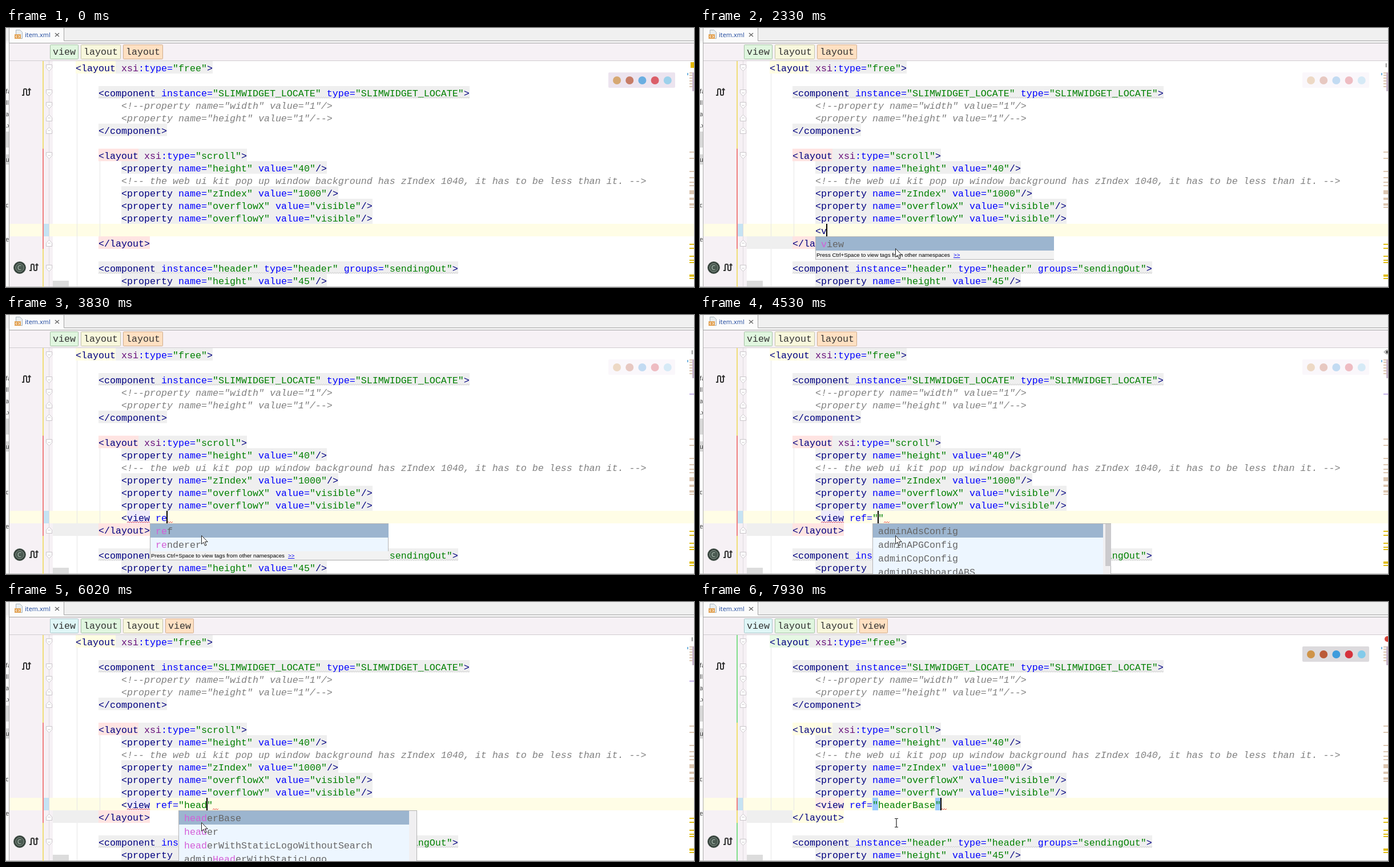
These frames come from a looping animation (1205x455 px, 8000 ms). An HTML page:

```html
<!DOCTYPE html>
<html lang="en">
<head>
<meta charset="utf-8">
<title>XML editor</title>
<style>
html, body { margin: 0; width: 100%; height: 100%; overflow: hidden; background: #fff; }
svg { display: block; width: 1205px; height: 455px; }
text { white-space: pre; font: 16.664px "Liberation Mono", monospace; }
.comment { font-style: italic; }
.ui { font: 11px "Open Sans", sans-serif; }
.hint { font: 9.7px "Liberation Sans", sans-serif; }
</style>
</head>
<body>
<svg viewBox="0 0 1205 455"><g id="base"></g><g id="live"></g></svg>
<script>
const ROW = 22, TOP = 58, CH = 10, EDIT = 13;
const GREY = '#efefef', RED = '#ffe4e2', YELLOW = '#fffde3', GREEN = '#e6f8e4';

const rect = (x, y, w, h, fill, more = '') =>
  `<rect x="${x}" y="${y}" width="${w}" height="${h}" fill="${fill}" ${more}/>`;
const path = (d, stroke, width = 1, fill = 'none', more = '') =>
  `<path d="${d}" stroke="${stroke}" stroke-width="${width}" fill="${fill}" ${more}/>`;
const circle = (x, y, r, fill, more = '') => `<circle cx="${x}" cy="${y}" r="${r}" fill="${fill}" ${more}/>`;
const esc = s => s.replace(/&/g, '&amp;').replace(/</g, '&lt;').replace(/>/g, '&gt;');
const text = (x, y, s, fill, more = '') => `<text x="${x}" y="${y}" fill="${fill}" ${more}>${s}</text>`;
const span = (s, fill) => `<tspan fill="${fill}">${esc(s)}</tspan>`;
const rowY = row => TOP + row * ROW;
const isComment = s => /<!--|-->/.test(s);

// [row, column x, code]
const code = [
  [0, 122, '<layout xsi:type="free">'],
  [2, 162, '<component instance="SLIMWIDGET_LOCATE" type="SLIMWIDGET_LOCATE">'],
  [3, 202, '<!--property name="width" value="1"/>'],
  [4, 202, '<property name="height" value="1"/-->'],
  [5, 162, '</component>'],
  [7, 162, '<layout xsi:type="scroll">'],
  [8, 202, '<property name="height" value="40"/>'],
  [9, 202, '<!-- the web ui kit pop up window background has zIndex 1040, it has to be less than it. -->'],
  [10, 202, '<property name="zIndex" value="1000"/>'],
  [11, 202, '<property name="overflowX" value="visible"/>'],
  [12, 202, '<property name="overflowY" value="visible"/>'],
  [14, 162, '</layout>'],
  [16, 162, '<component instance="header" type="header" groups="sendingOut">'],
  [17, 202, '<property name="height" value="45"/>']
];

function tokenColor(s, i) {
  if (i % 2 === 0) return '#000080';
  if (s[0] === '"') return '#008000';
  return s === 'xsi' ? '#660e7a' : '#0000ff';
}

function codeLine(row, x, s) {
  const y = rowY(row) + 18;
  if (isComment(s)) return text(x, y, esc(s), '#808080', 'class="comment"');
  const tokens = s.split(/("[^"]*"?|xsi|:?\w+=| \w+$)/);
  return text(x, y, tokens.map((p, i) => span(p, tokenColor(p, i))).join(''), '#000080');
}

function wave(x, y, w, color) {
  let d = `M${x} ${y + 1}`;
  for (let i = 2; i <= w; i += 2) d += `L${x + i} ${y + (i % 4 ? -1 : 1)}`;
  return path(d, color, .9);
}

function foldMark(row, end) {
  const y = rowY(row) + 12;
  const shape = end ? `M70.5 ${y + 5.5}h10v-6l-5-5l-5 5z` : `M70.5 ${y - 5.5}h10v6l-5 5l-5-5z`;
  return path(shape + `M73 ${y}h5`, '#c9c5c9', 1, '#fff');
}

const arrows = (x, y) =>
  path(`M${x - 7} ${y + 5}h3v-9q0-2 2-2h1q2 0 2 2v7q0 2 2 2h1q2 0 2-2v-8`, '#333', 2) +
  path(`M${x + 3} ${y - 4}l3-3.5l3 3.5z`, '#333', .6, '#333');

function drawBase() {
  let out = rect(0, 0, 1205, 455, '#fff') + rect(0, 0, 1205, 23, '#f0f0f0') + rect(0, 23, 1205, 4, '#f7f7f7') +
    rect(6, 0, 95, 26, '#fbfbfb') + path('M101.5 0V22.5H1205M6 26.5H1205', '#a5a5a5') +
    rect(6, 27, 1199, 30, '#f6f1f5') + rect(6, 57, 76, 398, '#f6f1f5') +
    path('M6 57.5H1205', '#d0ccd0');
  // File tab
  out += path('M17.5 3.5h7l4 4v11h-11z', '#a8b4bc', 1, '#e9eef1') + rect(15, 11, 11, 8, '#e3a65b') +
    path('M19 13l-2 2l2 2M22 13l2 2l-2 2', '#fff') +
    text(33, 16, 'item.xml', '#1a459c', 'class="ui"') + path('M86 9l7 6M86 15l7-6', '#666', 1.4);
  // Neighbouring pane
  out += rect(0, 27, 5, 428, '#fff') + rect(0, 182, 5, 28, '#d9d9d9') + rect(0, 222, 5, 18, '#d9d9d9');
  [['fa', 115], ['lli', 135], ['a', 155], ['.x', 175], ['uh', 235], ['c', 315], ['e', 375]]
    .forEach(([s, y]) => out += text(-1, y, s, '#333', 'class="ui"'));
  out += rect(6, 58, 58, 397, '#f6f1f5') + path('M5.5 0V455', '#aaa');
  // Current line and guides
  out += rect(6, rowY(EDIT), 1199, ROW, '#fffde6') + rect(66, rowY(EDIT), 10, ROW, '#c5e3f3') +
    path('M75.5 58V455', '#dedade') + path('M124.5 80V455M164.5 234V366', '#e6e6e6') +
    rect(82, 444, 28, 10, '#dcdcdc');
  [0, 2, 3, 7, 16].forEach(r => out += foldMark(r, false));
  [4, 5, 14].forEach(r => out += foldMark(r, true));
  out += arrows(35, 113) + arrows(48, 421) + circle(24, 421, 10.5, '#2c3832', 'stroke="#66736b"') +
    circle(24, 421, 7.5, '#4b5b52', 'stroke="#89968e"') + text(20, 425, 'C', '#b8c8bd', 'class="ui"');
  // Code backgrounds
  code.forEach(([row, x, s]) => {
    if (!isComment(s)) out += rect(x, rowY(row), s.length * CH, ROW, GREY);
  });
  out += wave(162, 122, 650, '#cfcfcf') + wave(162, 430, 630, '#cfcfcf');
  // Error stripe
  [78, 82, 87, 92, 97, 102, 217, 228, 251, 262, 270, 276, 314].forEach(y => out += rect(1197, y, 8, 2, '#dcc6b0'));
  [285, 298, 308].forEach(y => out += rect(1197, y, 8, y < 290 ? 7 : 4, '#dcc6b0'));
  out += rect(1202, 78, 3, 33, '#c9b7cc');
  [379, 386, 400, 407, 411, 433, 439].forEach(y => out += rect(1197, y, 8, y === 433 ? 4 : 2, '#e0bd10'));
  out += rect(1193, 79, 2, 4, '#74b4e0') + path('M0 454.5H1205', '#c0c0c0');
  return out;
}

function scopes(nested) {
  const [outer, inner] = nested ? [GREEN, YELLOW] : [YELLOW, RED];
  const [outerLine, innerLine] = nested ? ['#7fdd8a', '#f0e070'] : ['#f0dd78', '#f08080'];
  return rect(64, 58, 2, 397, outerLine) + rect(64, 212, 2, 176, innerLine) +
    (nested ? rect(64, 344, 2, 22, '#f08080') + rect(202, 344, 50, 22, '#ffece8') : '') +
    rect(122, 58, 70, ROW, outer) + rect(162, 212, 70, ROW, inner) + rect(162, 366, 90, ROW, inner);
}

function breadcrumbs(names) {
  const fills = ['#dff6f7', '#e0f6df', '#f8f7dc', '#ffe0c2'].slice(-names.length);
  const lines = ['#a9c5c8', '#a5c2a5', '#c5c4a8', '#cfac8c'].slice(-names.length);
  let x = 77;
  return names.map((name, i) => {
    const w = name.length * CH + 10;
    const out = rect(x + .5, 29.5, w - 1, 25, fills[i], `stroke="${lines[i]}" rx="1"`) + text(x + 5, 47, name, '#333');
    x += w + 4;
    return out;
  }).join('');
}

function statusMark(kind) {
  if (kind === 'square') return rect(1199, 60, 6, 10, '#e5b800');
  if (kind === 'tick') return rect(1201, 62, 1.5, 7, '#777');
  if (kind === 'error') return circle(1204, 65, 5, '#d8453c');
  return path('M1198 65q5-7 10 0q-5 7-10 0z', '#777', 1, '#fff') + circle(1203, 65, 2.3, '#555');
}

function browserBar(opacity, tint) {
  const icons = ['#cf9448', '#bb5a38', '#3f9cdc', '#d5323c', '#83cbea'];
  return rect(1055, 78, 117, 27, tint, `rx="2" opacity="${opacity}"`) +
    icons.map((c, i) => circle(1070 + i * 22.2, 92, 7, c, `opacity="${opacity ** .75}"`)).join('');
}

function itemText(item, query) {
  const at = query ? item.toLowerCase().indexOf(query) : -1;
  if (at < 0) return esc(item);
  const end = at + query.length;
  return esc(item.slice(0, at)) + span(item.slice(at, end), '#d45fd8') + esc(item.slice(end));
}

function popup({ x, items, query, scroll, thumb }) {
  const listH = items.length * 24, h = listH + (scroll ? 0 : 16);
  let out = rect(x + .5, 366.5, 417, h, '#edf6ff', 'stroke="#b4b4b4"') +
    rect(x + 1, 367, scroll ? 403 : 417, 24, '#9cb5cf');
  items.forEach((item, i) => out += text(x + 10, 385 + i * 24, itemText(item, query), '#666'));
  if (scroll) {
    out += rect(x + 404, 367, 13, h, '#f0eff1');
    if (thumb) out += rect(x + 408, 367, 10, 74, '#cbcacd');
  } else {
    const y = 367 + listH;
    out += rect(x + 1, y, 417, 15, '#f2f2f2') +
      text(x + 2, y + 11, 'Press Ctrl+Space to view tags from other namespaces', '#000', 'class="hint"') +
      text(x + 242, y + 11, '&gt;&gt;', '#0000ee', 'class="hint" text-decoration="underline"');
  }
  return out;
}

const pointer = ([x, y], arrow) => arrow
  ? path(`M${x - 1.5} ${y - .5}v15l3.5-3.2l2.6 6l2.4-1l-2.6-5.8h4.8z`, '#222', 1, '#fff')
  : path(`M${x - 3} ${y - 7.5}h2.5l.5.5l.5-.5h2.5M${x} ${y - 7}v14M${x - 3} ${y + 7.5}h2.5l.5-.5l.5.5h2.5`, '#222', 1.2);

const tagList = ['component', 'layout', 'property', 'view'];
const adminList = ['adminAdsConfig', 'adminAPGConfig', 'adminCopConfig', 'adminDashboardABS'];
const headList = ['headerBase', 'header', 'headerWithStaticLogoWithoutSearch', 'adminHeaderWithStaticLogo'];
const tags = (items, query) => ({ x: 202, items, query });
const attrs = (items, query) => ({ x: 252, items, query });
const refs = (items, query) => ({ x: 302, items, query, scroll: true, thumb: !query });

const start = {
  code: '', caret: -1, bar: .68, tint: '#e4d8e8', status: 'square', crumbs: ['view', 'layout', 'layout'],
  mouse: null, arrow: false, popup: null, waves: [], word: false, tail: false, stripe: false, quotes: false, nested: false
};

// Each step changes part of the state and holds until the next one.
const steps = [
  [70, { bar: .56, mouse: [180, 446] }],
  [150, { bar: .44, mouse: [130, 412] }],
  [230, { bar: .31, mouse: [104, 372] }],
  [310, { bar: .2, mouse: [95, 337] }],
  [460, { mouse: [180, 362] }],
  [540, { mouse: [310, 386] }],
  [620, { mouse: [403, 398] }],
  [700, { mouse: [365, 388] }],
  [780, { mouse: [311, 377] }],
  [1010, { mouse: [264, 354] }],
  [1550, { code: '<', caret: 1, status: 'eye', mouse: [344, 388] }],
  [1630, { popup: tags(tagList, ''), arrow: true }],
  [1790, { status: 'tick' }],
  [1870, { tail: true }],
  [2330, { code: '<v', caret: 2, popup: tags(['view'], 'v') }],
  [2490, { code: '<vi', caret: 3, popup: tags(['view'], 'vi') }],
  [2650, { code: '<view', caret: 5, popup: null }],
  [2730, { status: 'eye' }],
  [3040, { code: '<view ', caret: 6 }],
  [3120, { word: true }],
  [3200, { waves: [[1, 4], [6, 1]] }],
  [3280, { stripe: true }],
  [3650, { code: '<view r', caret: 7, waves: [[1, 4], [7, 1]] }],
  [3730, { popup: attrs(['ref', 'renderer', 'groups', 'attributes'], 'r'), status: 'tick' }],
  [3830, { code: '<view re', caret: 8, waves: [[1, 4], [8, 1]], popup: attrs(['ref', 'renderer'], 're') }],
  [4370, { code: '<view ref=""', caret: 11, waves: [[1, 4], [12, 1]], popup: null, status: 'eye' }],
  [4530, { popup: refs(adminList, '') }],
  [4690, { crumbs: ['view', 'layout', 'layout', 'view'], status: 'tick' }],
  [5310, { code: '<view ref="h"', caret: 12, waves: [[1, 4], [13, 1]], bar: .1 }],
  [5390, { bar: 0 }],
  [5550, { code: '<view ref="he"', caret: 13, waves: [[1, 4], [14, 1]] }],
  [5630, { popup: refs(headList, 'he') }],
  [5790, { code: '<view ref="hea"', caret: 14, waves: [[1, 4], [15, 1]], popup: refs(headList, 'hea') }],
  [6020, { code: '<view ref="head"', caret: 15, waves: [[1, 4], [16, 1]], popup: refs(headList, 'head') }],
  [6640, { code: '<view ref="headerBase"', caret: 22, waves: [[1, 4], [22, 1]], popup: null }],
  [6730, { quotes: true, arrow: false, status: 'eye' }],
  [7140, { word: false, waves: [[22, 1]], stripe: false }],
  [7300, { bar: .2, tint: '#dcdadd' }],
  [7380, { bar: .4 }],
  [7460, { bar: .6 }],
  [7530, { bar: .8 }],
  [7610, { bar: 1 }],
  [7770, { status: 'error' }],
  [7850, { nested: true }]
];

function drawLive(s) {
  const x = 202, y = rowY(EDIT);
  let out = scopes(s.nested) + breadcrumbs(s.crumbs) + statusMark(s.status) + browserBar(s.bar, s.tint);
  if (s.tail) out += rect(82, 366, 80, ROW, GREY) + foldMark(14, true);
  if (s.stripe) out += rect(1197, 138, 8, 2, '#c4b0e8');
  if (s.word) out += rect(x + CH, y, 4 * CH, ROW, '#eeeafa');
  if (s.quotes) out += rect(302, y, CH, ROW, '#99ccff') + rect(412, y, CH, ROW, '#99ccff');
  out += code.map(line => codeLine(...line)).join('') + codeLine(EDIT, x, s.code);
  out += s.waves.map(([col, n]) => wave(x + col * CH, 364, n * CH, '#e23c3c')).join('');
  if (s.caret >= 0) out += rect(x + s.caret * CH - 1, y, 2, ROW, '#000');
  if (s.popup) out += popup(s.popup);
  if (s.mouse) out += pointer(s.mouse, s.arrow);
  return out;
}

const live = document.getElementById('live');
document.getElementById('base').innerHTML = drawBase();
const origin = performance.now();
let shown = -1;

function tick() {
  const t = (performance.now() - origin) % 8000;
  const count = steps.filter(([at]) => at <= t).length;
  if (count !== shown) {
    shown = count;
    live.innerHTML = drawLive(Object.assign({}, start, ...steps.slice(0, count).map(step => step[1])));
  }
  requestAnimationFrame(tick);
}
tick();
</script>
</body>
</html>
```
